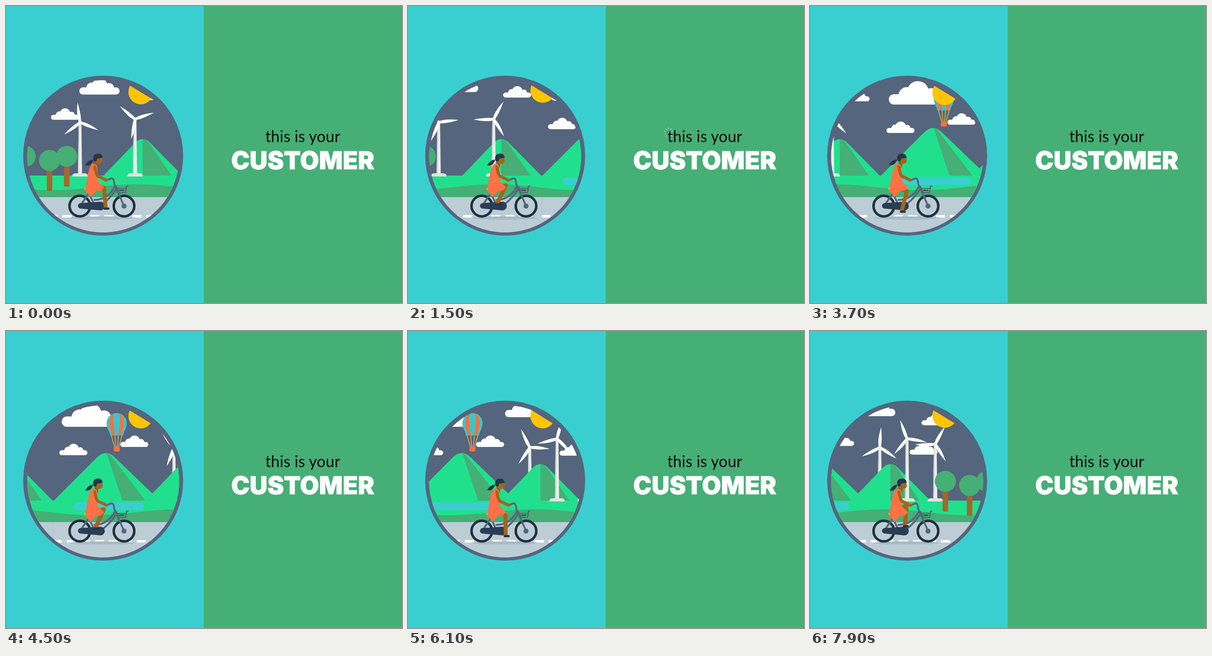
Write an HTML page that moves like this. It is 864 px wide and 648 px high and loops after 8000 ms.

```html
<!DOCTYPE html>
<html lang="en">
<head>
<meta charset="utf-8">
<title>This is your customer</title>
<style>
html, body { margin: 0; width: 100%; height: 100%; overflow: hidden; background: #39cfd0; }
svg { display: block; width: 864px; height: 648px; }
text { text-anchor: middle; }
.small { font: 400 34px Lato, "Open Sans", sans-serif; letter-spacing: .2px; fill: #0b0b0b; }
.big { font: 900 54px Inter, "Open Sans", sans-serif; fill: #fff; stroke: #fff; stroke-width: .8px; }
</style>
</head>
<body>
<svg viewBox="0 0 864 648">
  <defs>
    <clipPath id="lens"><path id="lensPath"/></clipPath>
    <g id="cloud" fill="#fff">
      <rect y="-11" width="61" height="11" rx="5.5"/>
      <circle cx="19" cy="-10" r="8.5"/><circle cx="31" cy="-13.5" r="11.5"/><circle cx="45" cy="-10" r="7.5"/>
    </g>
    <path id="blade" d="M0-2Q14-7 44 0Q14 5 0 2Z" fill="#fff"/>
    <g id="rotor">
      <use href="#blade"/><use href="#blade" transform="rotate(120)"/><use href="#blade" transform="rotate(240)"/>
      <circle r="4" fill="#f4f4f2"/>
    </g>
    <g id="tree">
      <rect x="-6" y="15" width="12" height="51" fill="#a5672a"/>
      <circle r="23" fill="#45af75"/>
    </g>
    <g id="peakA">
      <path d="M-87 372L-14 296Q0 285 14 296L89 372Z" fill="#20e08e"/>
      <path d="M0 291Q9 291 14 299L65 372H0Z" fill="#45af75"/>
    </g>
    <g id="peakB">
      <path d="M-115 372L-17 274Q0 259 17 273L120 372Z" fill="#20e08e"/>
      <path d="M2 267Q10 268 15 277L88 372H37Z" fill="#45af75"/>
    </g>
    <g id="balloon">
      <path d="M-12-36L-4.5-10M-4-36L-1.7-10M4-36L1.7-10M12-36L4.5-10" stroke="#e3b03c" stroke-width="1.7"/>
      <path d="M-14-35C-16-46-22-50-22-62A22 22 0 0 1 22-62C22-50 16-46 14-35Z" fill="#40c2c6"/>
      <path d="M-10-35C-13-48-16-54-16-64Q-14-79-6-83Q-9-72-7-60L-4-35ZM10-35C13-48 16-54 16-64Q14-79 6-83Q9-72 7-60L4-35Z" fill="#f9703f"/>
      <rect x="-6.5" y="-11" width="13" height="11" rx="2.5" fill="#f9703f"/>
    </g>
  </defs>

  <rect width="864" height="648" fill="#39cfd0"/>
  <rect x="431.5" width="433" height="648" fill="#45af75"/>
  <circle cx="212" cy="326.5" r="174.5" fill="#55657d"/>

  <g clip-path="url(#lens)">
    <g id="world"></g>
    <circle id="sun" r="27" fill="#ffc502"/>
    <rect x="30" y="417" width="364" height="90" fill="#bccdd6"/>
    <g id="road" fill="#fff"></g>
    <ellipse cx="211" cy="462.5" rx="72" ry="3.5" fill="#a9bac6"/>
  </g>

  <g fill="none" stroke-linecap="round" stroke-linejoin="round">
    <g stroke="#20303f" stroke-width="5.5">
      <circle cx="161" cy="436.5" r="22.4"/><circle cx="257.5" cy="436.5" r="22.4"/>
    </g>
    <g stroke="#55657d" stroke-width="4">
      <path d="M178 402L190 428M179 411L161 437"/>
      <path d="M238 393Q222 423 193 423M240 400Q229 418 210 433"/>
      <path d="M218 380C224 380 226 376 231 376Q236 377 236 388L258 437"/>
      <path d="M241 394L247 407H261L263 393H266" stroke-width="2.6"/>
      <path d="M243 398H262" stroke-width="2"/>
      <path d="M248 402H257" stroke="#33435a" stroke-width="2.4"/>
    </g>
    <circle cx="257.5" cy="436.5" r="5.5" fill="#55657d"/>
    <path d="M163 430L205 427A9.5 9.5 0 0 1 207 446L163 442A6 6 0 0 1 163 430Z" fill="#2b3d54"/>
    <path d="M173 399Q177 397 182 400" stroke="#ffb915" stroke-width="4.5"/>
    <path id="leg" stroke="#a2651c" stroke-width="8.5"/>
    <path id="shoe" stroke="#253548" stroke-width="5"/>
    <path d="M197 339V350" stroke="#905813" stroke-width="8"/>
  </g>
  <path d="M187 345Q195 342 199 349L201 383Q208 389 214 396L206 403L197 403L191 410L184 417L180 411L173 404Q175 386 178 372Q181 352 187 345Z" fill="#ff7045"/>
  <path d="M194 351Q195 363 200 371L219 380" fill="none" stroke="#a2651c" stroke-width="6.5" stroke-linecap="round" stroke-linejoin="round"/>
  <path d="M197 329H210L211 340Q208 345 199 345L194 340Z" fill="#a2651c"/>
  <path d="M190 333Q190 322 201 322Q210 322 211 331L199 333L197 339L192 339Z" fill="#25364a"/>
  <path id="ponytail" d="M191 335Q180 335 173 347Q183 351 189 339Z" fill="#25364a"/>

  <g id="spark" stroke="#fff" opacity=".75"></g>
  <text class="small" x="647.5" y="297">this is your</text>
  <text class="big" x="647.5" y="355.5">CUSTOMER</text>
</svg>
<script>
const LOOP = 8000, STEP = 100, SPEED = 0.063, SCENE = 751;
const $ = id => document.getElementById(id);
const use = (href, x, y, size = 1) => `<use href="#${href}" transform="translate(${x} ${y}) scale(${size})"/>`;
const place = (el, x, y, more = '') => el.setAttribute('transform', `translate(${x} ${y}) ${more}`);
const polar = (r, deg) => [r * Math.cos(deg * Math.PI / 180), r * Math.sin(deg * Math.PI / 180)];
const repeat = (n, fn) => Array.from({ length: n }, (_, i) => fn(i)).join('');

const cloud = (x, y, size) => use('cloud', x, y, size);

// The first turbine stands behind its hill.
const turbines = [
  { x: 650, y: 254, angle: -22, rate: 83 },
  { x: 161.5, y: 254, angle: 23, rate: 220 },
  { x: 281.5, y: 247, angle: 101, rate: 212 },
  { x: 709.5, y: 235, angle: 28, rate: 180 },
  { x: 771, y: 247, angle: 53, rate: 183 }
];

const turbine = ({ x, y }) =>
  `<path d="M${x - 3} ${y}h6L${x + 4.5} 368h-9Z" fill="#ececea"/>` +
  `<path d="M${x - 3} ${y}h2L${x - 2} 368h-2.5Z" fill="#d8d8d6"/>` +
  `<path d="M${x - 17} 372q0-7 7-7h20q7 0 7 7z" fill="#e2e2df"/>` +
  '<g class="rotor"><use href="#rotor"/></g>';

const hill = 'M-20 417' + repeat(99, i => {
  const x = i * 10 - 20;
  return `L${x} ${395.5 - 6.5 * Math.cos(2 * Math.PI * (x - 285) / (SCENE / 2))}`;
}) + 'V417Z';

function build() {
  const rim = deg => {
    const [x, y] = polar(166, deg);
    return `${212 + x} ${328 + y}`;
  };
  // The lens has one straight edge at the upper right.
  $('lensPath').setAttribute('d', `M${rim(-46)}A166 166 0 1 1 ${rim(-71)}Z`);

  const [behind, ...front] = turbines;
  $('world').innerHTML =
    '<g id="sky">' +
    cloud(160, 190, 1.44) + cloud(596, 188, 1.44) + cloud(405, 209, 2.05) +
    cloud(98, 245) + cloud(302, 202) + cloud(400, 271) +
    cloud(533, 253) + cloud(715, 272) + cloud(741, 208) +
    '</g>' +
    use('balloon', 525, 263) + turbine(behind) +
    use('peakB', 501, 0) + use('peakA', 298, 0) + use('peakA', 673, 0) +
    '<rect x="-20" y="370" width="980" height="47" fill="#20e08e"/>' +
    front.map(turbine).join('') +
    '<rect x="432" y="374" width="152" height="16.5" rx="8" fill="#39cfd0"/>' +
    `<path d="${hill}" fill="#45af75"/>` +
    [0, SCENE].map(x => use('tree', x + 42, 328) + use('tree', x + 132.5, 328) + use('tree', x + 95, 337)).join('');

  const dash = x => `<rect x="${x}" y="456" width="20" height="5.5"/>`;
  $('road').innerHTML =
    repeat(11, i => dash(31 + 30.6 * i)) + repeat(18, i => dash(385.5 + 30.6 * i)) +
    '<rect x="386" y="417" width="1" height="80" fill="#b0c2cc"/>';

  $('spark').innerHTML = repeat(9, i => `<path d="M7 0H11" transform="rotate(${i * 36 + 50})"/>`);
}

// Two-bone leg from the hip to the turning pedal.
function pedal(deg) {
  const hip = [185, 393], thigh = 29, shin = 42;
  const [px, py] = polar(12, deg);
  const foot = [206 + px, 434 + py];
  const dx = foot[0] - hip[0], dy = foot[1] - hip[1], d = Math.hypot(dx, dy);
  const along = (thigh * thigh - shin * shin + d * d) / (2 * d);
  const off = Math.sqrt(Math.max(0, thigh * thigh - along * along));
  const knee = [hip[0] + (dx * along + dy * off) / d, hip[1] + (dy * along - dx * off) / d];
  $('leg').setAttribute('d', `M${hip}L${knee}L${foot}`);
  $('shoe').setAttribute('d', `M${foot[0] - 2} ${foot[1] + 4}h8`);
}

build();
const rotors = document.querySelectorAll('.rotor');

function draw(t) {
  const bob = Math.cos(2 * Math.PI * (t - 500) / 3200);
  place($('world'), -SPEED * t, 0);
  place($('road'), -SPEED * t, 0);
  place($('sky'), 0, 6 * bob);
  place($('sun'), 294, 185.5 + 3.5 * bob);
  turbines.forEach(({ x, y, angle, rate }, i) => place(rotors[i], x, y, `rotate(${angle + rate * t / 1000})`));

  pedal(20 + 0.1234 * t);
  $('ponytail').setAttribute('transform', `rotate(${4 * Math.sin(t / 470)} 190 336)`);

  // A short sparkle runs along the small line.
  $('spark').style.display = t >= 1500 && t < 2000 ? '' : 'none';
  place($('spark'), 569 + (t - 1500) * 0.16, 276);
}

const begin = performance.now();
function tick(now) {
  const t = Math.max(0, now - begin) % LOOP;
  draw(Math.floor(t / STEP) * STEP);
  requestAnimationFrame(tick);
}
draw(0);
requestAnimationFrame(tick);
</script>
</body>
</html>
```
